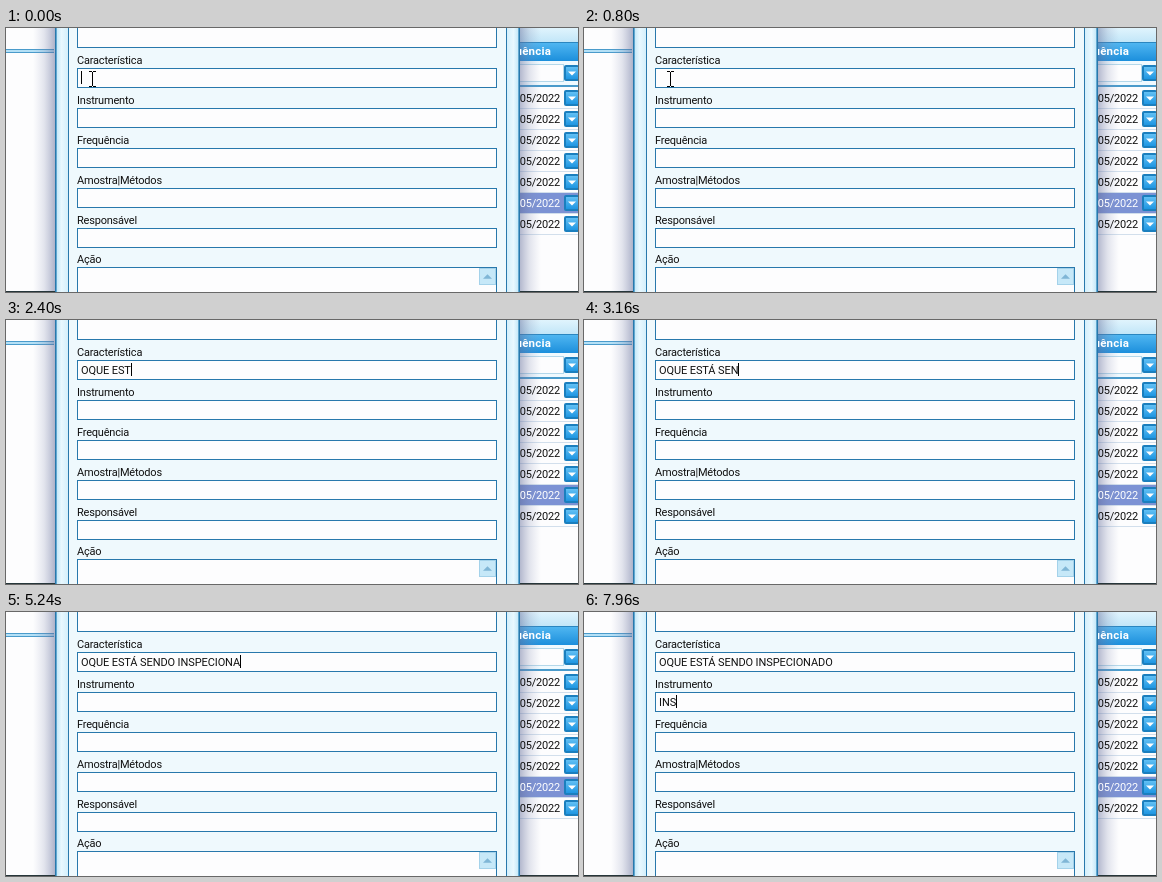
Write an HTML page with a canvas that moves like this. It is 572 by 264 pixels and loops after 8000 ms.

```html
<!DOCTYPE html>
<html lang="pt">
<head>
<meta charset="utf-8">
<title>Formulário</title>
<style>
html, body { margin: 0; width: 100%; height: 100%; overflow: hidden; background: #fdfdff; }
canvas { display: block; }
</style>
</head>
<body>
<canvas id="stage" width="572" height="264"></canvas>
<script>
const ctx = document.getElementById('stage').getContext('2d');
const W = 572, H = 264, LOOP = 8000, BLINK = 530;
const BLUE = '#2878ac', INK = '#101010', PAPER = '#fdfdfe';
const SHADE = ['rgba(95,105,150,.5)', 'rgba(120,130,170,.2)', 'rgba(140,150,190,0)'];
const LABELS = ['Característica', 'Instrumento', 'Frequência', 'Amostra|Métodos', 'Responsável', 'Ação'];

// Key times for each character, per field
const FIELDS = [
  { text: 'OQUE ESTÁ SENDO INSPECIONADO', x: 75, y: 54, focus: -130,
    keys: [1160, 1280, 1400, 1560, 1760, 1920, 2080, 2240, 2440, 2600, 2760, 2920, 3080,
           3240, 3400, 3600, 3840, 4080, 4200, 4320, 4440, 4600, 4720, 4840, 5000, 5160, 5480, 5680] },
  { text: 'INS', x: 75, y: 94, focus: 6200, keys: [7680, 7800, 7920] }
];

function box(x, y, w, h, color) {
  ctx.fillStyle = color;
  ctx.fillRect(x, y, w, h);
}

function frame(x, y, w, h, edge, fill) {
  box(x, y, w, h, edge);
  box(x + 1, y + 1, w - 2, h - 2, fill);
}

function fade(x, y, w, h, colors, across) {
  const g = across ? ctx.createLinearGradient(x, 0, x + w, 0) : ctx.createLinearGradient(0, y, 0, y + h);
  colors.forEach((c, i) => g.addColorStop(i / (colors.length - 1), c));
  box(x, y, w, h, g);
}

function write(text, x, y, { color = INK, align = 'left', font = '11px Roboto, sans-serif', spacing = '-0.2px' } = {}) {
  ctx.font = font;
  ctx.letterSpacing = spacing;
  ctx.textAlign = align;
  ctx.fillStyle = color;
  ctx.fillText(text, x, y);
}

function triangle(cx, cy, r, dir, color) {
  ctx.fillStyle = color;
  ctx.beginPath();
  ctx.moveTo(cx - r, cy - dir * r / 2);
  ctx.lineTo(cx + r, cy - dir * r / 2);
  ctx.lineTo(cx, cy + dir * r / 2);
  ctx.fill();
}

function dropdown(y) {
  ctx.fillStyle = '#1b7fbe';
  ctx.beginPath();
  ctx.roundRect(558, y - 8, 15, 16, 2);
  ctx.fill();
  fade(560, y - 6, 12, 12, ['#62c0f4', '#1e96e2'], false);
  triangle(566, y + 0.5, 4, 1, '#fff');
}

function drawLeft() {
  box(0, 0, 50, H, PAPER);
  box(0, 21, 48, 4, '#4a9bcb');
  box(0, 22, 48, 2, '#b4e0f6');
  fade(27, 0, 22, H, [...SHADE].reverse(), true);
  box(0, 263, 49, 1, '#26363a');
}

function drawTable() {
  const rows = [0, 1, 2, 3, 4, 5, 6].map(i => ({ y: 70 + i * 21, chosen: i === 5 }));
  box(513, 0, 59, H, PAPER);
  fade(513, 0, 59, 14, ['#e0f4fd', '#c2e6f8'], false);
  fade(513, 14, 59, 19, ['#52b8f2', '#1c8fdc'], false);
  box(513, 14, 59, 1, '#2a86c0');
  box(513, 33, 59, 24, '#f0faff');
  frame(505, 36, 53, 18, '#b4d8ea', PAPER);
  box(513, 57, 59, 2, '#4a9bcb');
  for (const { y, chosen } of rows) {
    if (chosen) box(513, y - 10, 59, 20, '#7c92d4');
    box(513, y + 10, 59, 1, '#d2dfec');
  }
  fade(513, 0, 22, H, SHADE, true);
  write('uência', 545, 27, { color: '#fff', align: 'right', font: 'bold 11.5px Roboto, sans-serif', spacing: '0.2px' });
  dropdown(45);
  for (const { y, chosen } of rows) {
    write('05/2022', 554, y + 4, { color: chosen ? '#fff' : INK, align: 'right' });
    dropdown(y);
  }
  box(513, 263, 59, 1, '#26363a');
}

function drawForm() {
  const edge = ['#b8e2f6', '#e8f8ff', '#d4effb'];
  fade(49, 0, 13, H, edge, true);
  box(62, 0, 438, H, '#eff9fd');
  fade(501, 0, 13, H, [...edge].reverse(), true);
  box(49, 0, 1, H, BLUE);
  box(50, 0, 1, H, '#62a8d0');
  box(62, 0, 1, H, BLUE);
  box(500, 0, 1, H, BLUE);
  box(512, 0, 1, H, '#62a8d0');
  box(513, 0, 1, H, BLUE);
  frame(71, -5, 420, 25, BLUE, PAPER);
  LABELS.forEach((label, i) => {
    const last = i === LABELS.length - 1, y = 40 + 40 * i - last;
    write(label, 71, y - 4);
    frame(71, y, 420, last ? 40 : 20, BLUE, PAPER);
  });
  frame(473, 240, 17, 17, '#a4d2ea', '#c6e8f8');
  triangle(481.5, 248.5, 4.5, -1, '#7fb6d6');
}

function drawTyping(t) {
  const active = t < FIELDS[1].focus ? 0 : 1;
  FIELDS.forEach((f, i) => {
    const hits = f.keys.filter(k => k <= t);
    const shown = f.text.slice(0, hits.length);
    write(shown, f.x, f.y, { spacing: '-0.1px' });
    const since = t - (hits.length ? hits[hits.length - 1] : f.focus);
    if (i === active && Math.floor(since / BLINK) % 2 === 0) {
      const x = Math.round(f.x + ctx.measureText(shown).width);
      box(x, f.y - 11, 1, 13, '#000');
    }
  });
  if (t < FIELDS[0].keys[0]) drawPointer(86, 43);
}

function drawPointer(x, y) {
  box(x, y + 1, 1, 14, '#000');
  for (const dy of [0, 15]) {
    box(x - 3, y + dy, 3, 1, '#000');
    box(x + 1, y + dy, 3, 1, '#000');
  }
}

function draw(now) {
  ctx.clearRect(0, 0, W, H);
  drawLeft();
  drawTable();
  drawForm();
  drawTyping((now - start) % LOOP);
  requestAnimationFrame(draw);
}

const start = performance.now();
draw(start);
</script>
</body>
</html>
```
